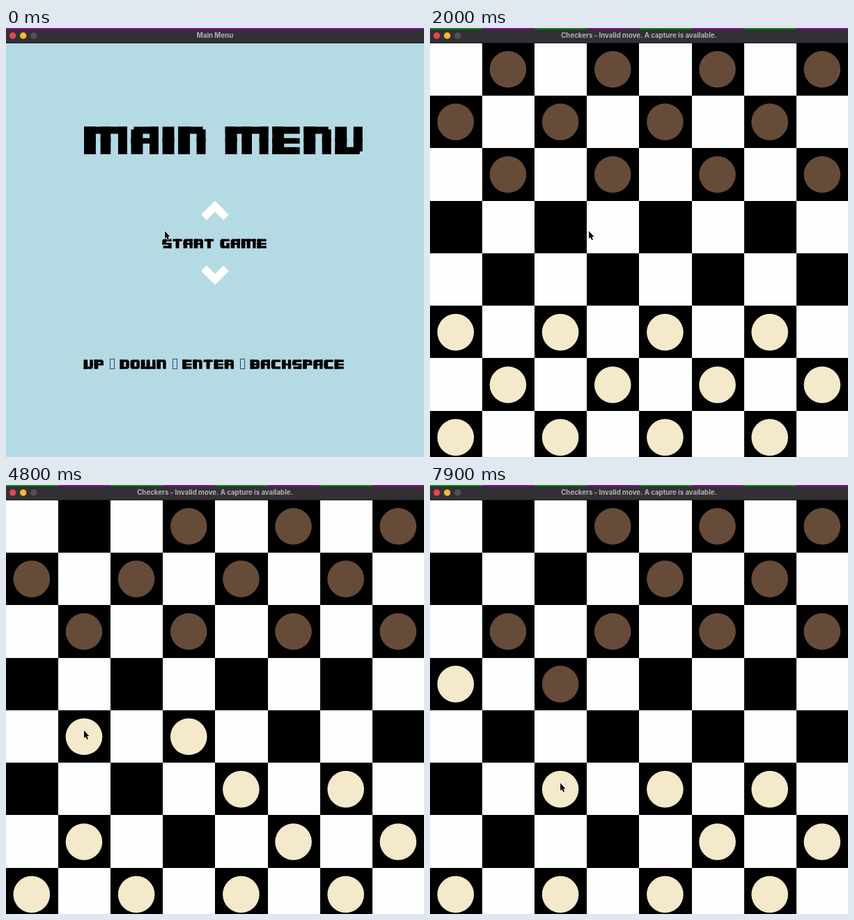
Write an HTML page with a canvas that moves like this. It is 600 px wide and 615 px high and loops after 8 s.

```html
<!DOCTYPE html>
<html lang="en">
<head>
<meta charset="utf-8">
<title>Checkers</title>
<style>
  html, body { margin: 0; width: 100%; height: 100%; overflow: hidden; background: #b4dae4; }
  canvas { display: block; }
</style>
</head>
<body>
<canvas id="stage" width="600" height="615"></canvas>
<script>
const ctx = document.getElementById('stage').getContext('2d');
const LOOP = 8000, STEP = 100, GAME_START = 2000;
const BROWN = '#664b39', CREAM = '#f5e9cb';

// Block letters, seven units high: t m b are the top, middle and bottom bars,
// l c r the upper halves of the left, centre and right stems, L C R the lower halves.
const LETTERS = {
  A: 'tmlLrR', B: 'tmblLrR', C: 'tblL', D: 'tblLrR', E: 'tmblL', F: 'tmlL', G: 'tblLR', I: 'lL',
  K: 'mlLrR', L: 'blL', M: 'tlLcCrR', N: 'tlLrR', O: 'tblLrR', P: 'tmlLr', R: 'tmlLrR', S: 'tmblR',
  T: 'tcC', U: 'blLrR', W: 'blLcCrR', Y: 'mlrC', 1: 'lL', 2: 'tmbrL', 3: 'tmbrR', 4: 'mlrR'
};
const advance = ch => ch === '□' ? 3.5 : ' I1'.includes(ch) ? 4 : 'MW'.includes(ch) ? 12 : 8;
const textUnits = text => [...text].reduce((sum, ch) => sum + advance(ch), -1);

function drawLetter(ch, x, y, unit) {
  const parts = LETTERS[ch] || '', w = advance(ch) - 1;
  const cutLeft = 'ACGOS'.includes(ch) ? 0.7 : 0, cutRight = 'BDNOPRU'.includes(ch) ? 0.7 : 0;
  const bar = (bx, by, bw, bh) => ctx.fillRect(x + bx * unit, y + by * unit, bw * unit, bh * unit);
  const stem = (bx, bw, lower, cut) => {
    const top = lower ? 3 : parts.includes('t') ? cut : 0;
    const bottom = !lower ? 4 : parts.includes('b') ? 7 - cut : 7;
    bar(bx, top, bw, bottom - top);
  };
  for (const part of parts) {
    const row = 'tmb'.indexOf(part), lower = part < 'a';
    if (row === 1) bar(0, 2.9, w, 1.4);
    else if (row >= 0) bar(cutLeft, row * 2.6, w - cutLeft - cutRight, 1.8);
    else if (part.toLowerCase() === 'l') stem(0, 3, lower, cutLeft);
    else if (part.toLowerCase() === 'r') stem(w - 2.3, 2.3, lower, cutRight);
    else stem(w / 2 - 1.3, 2.6, lower, 0);
  }
}

function blockText(text, x, y, unit) {
  ctx.lineWidth = 1;
  ctx.strokeStyle = '#34466f';
  for (const ch of text) {
    ctx.fillStyle = '#000';
    if (ch === '□') ctx.strokeRect(Math.round(x) + 0.5, y - 1, 6, 14);
    else drawLetter(ch, x, y, unit);
    x += advance(ch) * unit;
  }
}
const centredText = (text, x, y, unit) => blockText(text, x - textUnits(text) * unit / 2, y, unit);

function disc(x, y, radius, fill) {
  ctx.fillStyle = fill;
  ctx.beginPath();
  ctx.arc(x, y, radius, 0, 2 * Math.PI);
  ctx.fill();
}

// Brown and cream take turns at an even pace.
const MOVES = 'b6a5 c3d4 c7b6 a3b4 a5c3 d2b4 b8c7 b4a5 b6c5 d4b6 a7c5 b2c3 c7b6'.split(' ').map((name, i) => {
  const square = k => [8 - name[k + 1], 'abcdefgh'.indexOf(name[k])];
  return { time: 2200 + 433 * i, from: square(0), to: square(2), byPlayer: i % 2 === 1 };
});
const centre = ([r, c]) => [36.8 + 75.15 * c, 59.3 + 75.37 * r];

// The player drags the cream pieces; brown answers without the pointer.
const above = square => [centre(square)[0], centre(square)[1] - 9];
const POINTER = [
  [0, 228, 291], [GAME_START, 228, 291], [2700, 200, 374], [6500, 132, 229],
  ...MOVES.filter(move => move.byPlayer).flatMap(({ time, from, to }) =>
    [[time - 250, ...above(from)], [time, ...above(to)]])
].sort((a, b) => a[0] - b[0]);

function pointerAt(t) {
  const next = POINTER.findIndex(key => key[0] > t);
  if (next < 0) return POINTER[POINTER.length - 1].slice(1);
  const [t0, x0, y0] = POINTER[next - 1], [t1, x1, y1] = POINTER[next];
  const k = (t - t0) / (t1 - t0);
  return [x0 + (x1 - x0) * k, y0 + (y1 - y0) * k];
}

function drawPointer(t) {
  ctx.save();
  ctx.translate(...pointerAt(t));
  const arrow = new Path2D('M0 0V11L2.4 9L4.2 13L6 12.2L4.3 8.3H7.5Z');
  ctx.strokeStyle = '#fff';
  ctx.lineWidth = 1.2;
  ctx.stroke(arrow);
  ctx.fillStyle = '#000';
  ctx.fill(arrow);
  ctx.restore();
}

function drawWindow(title, striped) {
  ctx.fillStyle = '#323034';
  ctx.fillRect(0, 0, 600, 22);
  ctx.fillStyle = '#1a181b';
  ctx.fillRect(0, 21, 600, 1);
  for (let i = 0; i < 8; i++) {
    ctx.fillStyle = striped && i % 2 === 0 ? '#078a10' : '#8b0da2';
    ctx.fillRect(i * 75, 0, 75, 2);
  }
  ['#ee4350', '#f3b92f', '#515053'].forEach((fill, i) => disc(9.7 + 15 * i, 11, 4.7, fill));
  ctx.fillStyle = '#b1b0b3';
  ctx.font = '700 9.7px Inter, sans-serif';
  ctx.textAlign = 'center';
  ctx.fillText(title, 300, 14);
}

function drawArrows() {
  ctx.strokeStyle = '#fff';
  ctx.lineWidth = 11;
  for (const side of [-1, 1]) {
    ctx.beginPath();
    for (const x of [-16, 0, 16]) ctx.lineTo(300 + x, 308 + side * (52.5 - Math.abs(x)));
    ctx.stroke();
  }
}

function drawMenu(option) {
  blockText('MAIN MENU', 112, 141.5, 5.63);
  drawArrows();
  centredText(option, 299, 302.5, 1.89);
  blockText('UP □ DOWN □ ENTER □ BACKSPACE', 111.5, 475.5, 1.89);
}

function drawDifficulty(level) {
  blockText('GAME DIFFICULTY', 112, 139.5, 3.75);
  drawArrows();
  centredText(String(level), 298, 296, 2.81);
}

function boardAt(t) {
  const board = [...Array(8)].map((_, r) => [...Array(8)].map((_, c) =>
    (r + c) % 2 === 0 ? null : r < 3 ? BROWN : r > 4 ? CREAM : null));
  for (const { time, from: [r, c], to: [r2, c2] } of MOVES) {
    if (time > t) break;
    board[r2][c2] = board[r][c];
    board[r][c] = null;
    if (Math.abs(r2 - r) === 2) board[(r + r2) / 2][(c + c2) / 2] = null;
  }
  return board;
}

function drawBoard(t) {
  ctx.fillStyle = '#fefefe';
  ctx.fillRect(0, 22, 600, 593);
  const left = c => Math.round(75.1 * c), top = r => Math.round(21.7 + 75.3 * r);
  boardAt(t).forEach((row, r) => row.forEach((piece, c) => {
    if ((r + c) % 2 === 0) return;
    ctx.fillStyle = '#000';
    ctx.fillRect(left(c), top(r), left(c + 1) - left(c), top(r + 1) - top(r));
    if (piece) disc(...centre([r, c]), 26.3, piece);
  }));
}

function draw(t) {
  ctx.fillStyle = '#b4dae4';
  ctx.fillRect(0, 0, 600, 615);
  const playing = t >= GAME_START;
  if (playing) drawBoard(t);
  else if (t >= 600 && t < 1500) drawDifficulty(Math.min(4, Math.floor(t / 100) - 5));
  else drawMenu(t < 300 || t >= 1700 ? 'START GAME' : 'DIFFICULTY');
  const title = playing ? 'Checkers - Invalid move. A capture is available.'
    : t < 600 ? 'Main Menu' : 'Difficulty';
  drawWindow(title, playing);
  drawPointer(t);
}

const start = performance.now();
function frame() {
  const t = (performance.now() - start) % LOOP;
  draw(Math.floor(t / STEP) * STEP);
  requestAnimationFrame(frame);
}
frame();
</script>
</body>
</html>
```
